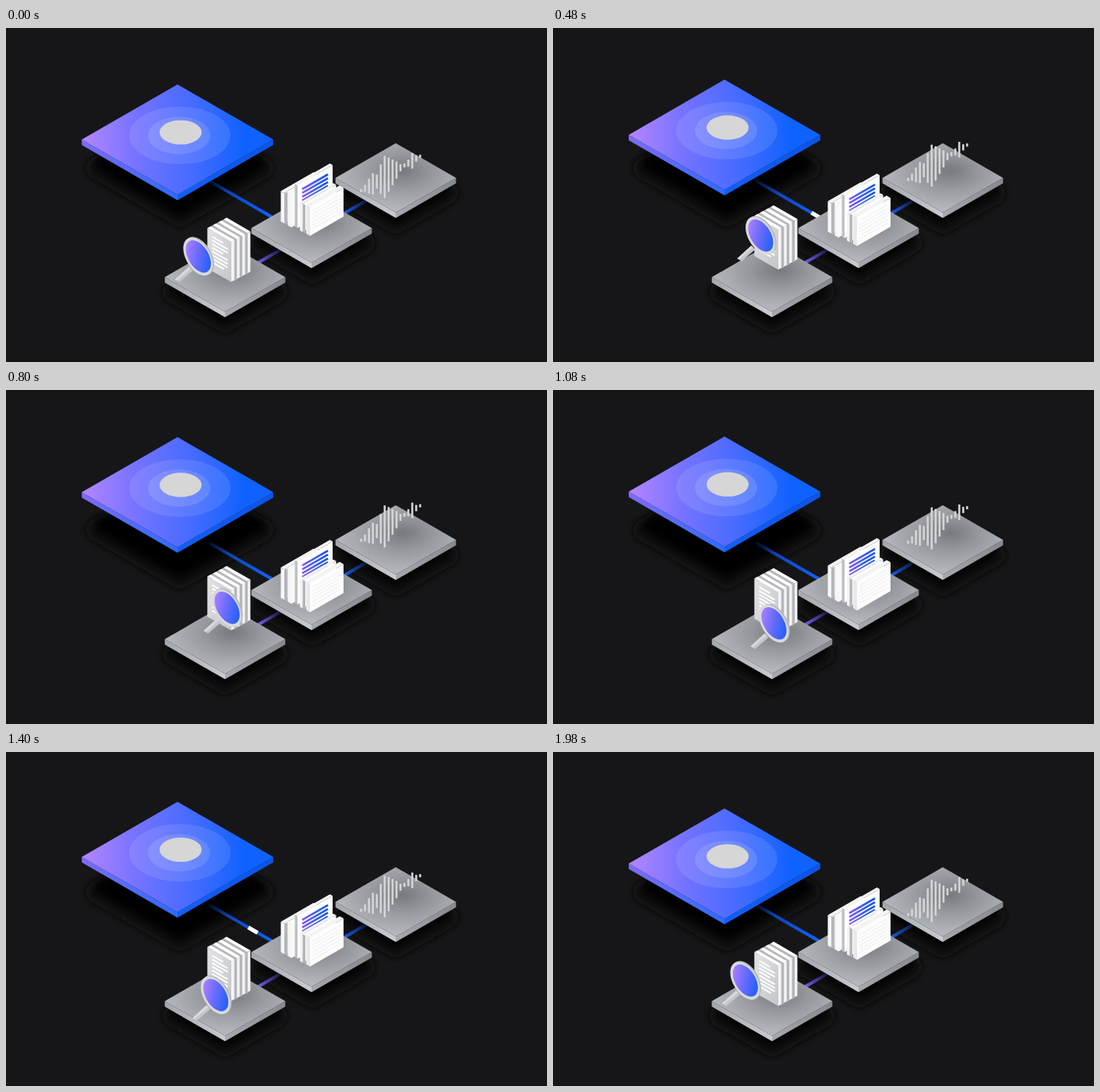
These frames come from a looping animation (694x429 px, 2.02 s). An HTML page:

```html
<!DOCTYPE html>
<html lang="en">
<head>
<meta charset="utf-8">
<title>Isometric platforms</title>
<style>
  html, body { margin: 0; width: 100%; height: 100%; overflow: hidden; background: #161618; }
  svg { display: block; width: 100%; height: 100%; }
</style>
</head>
<body>
<svg id="stage" viewBox="0 0 694 429">
  <defs>
    <linearGradient id="bigTop">
      <stop offset="0" stop-color="#b486ff"/><stop offset=".28" stop-color="#7673ff"/>
      <stop offset=".6" stop-color="#416aff"/><stop offset=".85" stop-color="#0f62fe"/>
    </linearGradient>
    <linearGradient id="bigLeft">
      <stop offset="0" stop-color="#7d6cf8"/><stop offset="1" stop-color="#2b6cff"/>
    </linearGradient>
    <linearGradient id="bigRight">
      <stop offset="0" stop-color="#1060f8"/><stop offset="1" stop-color="#0b54e4"/>
    </linearGradient>
    <radialGradient id="top" cx=".56" cy=".4" r=".55">
      <stop offset="0" stop-color="#77797d"/><stop offset=".45" stop-color="#95989c"/>
      <stop offset="1" stop-color="#b3b6bb"/>
    </radialGradient>
    <linearGradient id="left">
      <stop offset="0" stop-color="#a4a7ab"/><stop offset="1" stop-color="#c8cbcf"/>
    </linearGradient>
    <linearGradient id="right">
      <stop offset="0" stop-color="#a6a9ad"/><stop offset="1" stop-color="#85888c"/>
    </linearGradient>
    <linearGradient id="lens" x1="0" y1=".4" x2="1" y2=".6">
      <stop offset="0" stop-color="#a97fff"/><stop offset=".5" stop-color="#646afb"/>
      <stop offset="1" stop-color="#1f60fa"/>
    </linearGradient>
    <linearGradient id="text" gradientUnits="userSpaceOnUse" x1="380" y1="0" x2="413" y2="0">
      <stop offset="0" stop-color="#8a5cf0"/><stop offset=".5" stop-color="#3f5ff0"/>
      <stop offset="1" stop-color="#0f56e8"/>
    </linearGradient>
    <linearGradient id="page" x1="0" y1="0" x2="1" y2="1">
      <stop offset="0" stop-color="#e2e3e5"/><stop offset="1" stop-color="#c4c6c9"/>
    </linearGradient>
    <linearGradient id="mainBeam" gradientUnits="userSpaceOnUse" x1="260" y1="196" x2="340" y2="242">
      <stop offset="0" stop-color="#0f3fb0" stop-opacity=".15"/>
      <stop offset=".35" stop-color="#1044bc"/><stop offset="1" stop-color="#0f62fe"/>
    </linearGradient>
    <linearGradient id="rightBeam" gradientUnits="userSpaceOnUse" x1="434" y1="238" x2="462" y2="222">
      <stop offset="0" stop-color="#1a5cf0"/><stop offset="1" stop-color="#0c1634"/>
    </linearGradient>
    <linearGradient id="leftBeam" gradientUnits="userSpaceOnUse" x1="324" y1="301" x2="352" y2="285">
      <stop offset="0" stop-color="#6f5fe8"/><stop offset="1" stop-color="#14153a"/>
    </linearGradient>
    <filter id="soft" x="-20%" y="-30%" width="140%" height="160%"><feGaussianBlur stdDeviation="5"/></filter>
  </defs>
</svg>
<script>
const NS = 'http://www.w3.org/2000/svg';
const SLOPE = 0.577;
const LOOP = 2020, ACTIVE = 1980;
const stage = document.getElementById('stage');

function add(parent, tag, attrs) {
  const node = document.createElementNS(NS, tag);
  for (const key in attrs) node.setAttribute(key, attrs[key]);
  parent.appendChild(node);
  return node;
}
const group = (parent = stage) => add(parent, 'g', {});
const poly = (parent, points, fill, extra) =>
  add(parent, 'polygon', { points: points.join(' '), fill, ...extra });
const line = (parent, x1, y1, x2, y2, stroke, width) =>
  add(parent, 'line', { x1, y1, x2, y2, stroke, 'stroke-width': width });
const ellipse = (parent, cx, cy, rx, ry, fill, extra) =>
  add(parent, 'ellipse', { cx, cy, rx, ry, fill, ...extra });

const diamond = (cx, cy, hw) => {
  const hh = hw * SLOPE;
  return [[cx, cy - hh], [cx + hw, cy], [cx, cy + hh], [cx - hw, cy]];
};

// A faint wide layer with a darker core.
function shadow(cx, cy, hw) {
  const layer = (y, size, color, width) => poly(stage, diamond(cx, y, size), color, {
    stroke: color, 'stroke-width': width, 'stroke-linejoin': 'round', filter: 'url(#soft)'
  });
  layer(cy, hw, '#0e0e10', 28);
  layer(cy - 6, hw - 7, '#040405', 18);
}

function platform(parent, cx, cy, hw, fills) {
  const low = cy + hw * SLOPE, depth = 7;
  poly(parent, [[cx - hw, cy], [cx, low], [cx, low + depth], [cx - hw, cy + depth]], fills[1]);
  poly(parent, [[cx + hw, cy], [cx, low], [cx, low + depth], [cx + hw, cy + depth]], fills[2]);
  poly(parent, diamond(cx, cy, hw), fills[0]);
}

const tile = (cx, cy) =>
  platform(stage, cx, cy, 77.3, ['url(#top)', 'url(#left)', 'url(#right)']);

// Upright sheet whose face runs up to the right; (x, y) is the lower left corner of the face.
function sheetUp(parent, x, y, w, h, depth, side) {
  const rise = w * SLOPE, dy = depth * SLOPE;
  poly(parent, [[x, y], [x - depth, y - dy], [x - depth, y - h - dy], [x, y - h]], side);
  poly(parent, [[x, y - h], [x - depth, y - h - dy], [x + w - depth, y - h - rise - dy],
    [x + w, y - h - rise]], '#f4f4f4');
  poly(parent, [[x, y], [x + w, y - rise], [x + w, y - h - rise], [x, y - h]], '#fdfdfd');
}

// Upright sheet whose face runs down to the right; (x, y) is the upper left corner of the face.
function sheetDown(parent, x, y, w, h, depth) {
  const drop = w * SLOPE, dy = depth * SLOPE;
  poly(parent, [[x, y], [x + depth, y - dy], [x + w + depth, y + drop - dy], [x + w, y + drop]], '#ffffff');
  poly(parent, [[x + w, y + drop], [x + w + depth, y + drop - dy],
    [x + w + depth, y + drop + h - dy], [x + w, y + drop + h]], '#f4f4f5');
  poly(parent, [[x, y], [x + w, y + drop], [x + w, y + drop + h], [x, y + h]], 'url(#page)');
}

shadow(223, 180, 106);
shadow(500, 212, 66);
shadow(393, 276, 66);
shadow(281, 339, 66);

line(stage, 260, 196, 352, 249, 'url(#mainBeam)', 4.2);
line(stage, 420, 246, 472, 216, 'url(#rightBeam)', 4.2);
line(stage, 312, 308, 364, 278, 'url(#leftBeam)', 4.2);
const pulse = line(stage, -6, -3.5, 6, 3.5, '#ffffff', 5.2);

const hub = group();
platform(hub, 220, 143.3, 122.8, ['url(#bigTop)', 'url(#bigLeft)', 'url(#bigRight)']);
ellipse(hub, 223, 138, 65, 37, '#ffffff', { opacity: .1 });
ellipse(hub, 222, 138, 40, 24, '#ffffff', { opacity: .12 });
ellipse(hub, 224, 134, 27, 15.6, '#d6d6d6');

tile(500, 192.5);
const wave = group();
[4, 9, 19, 27, 18, 38, 54, 44, 33, 22, 9, 5, 9, 20, 8, 4].forEach((h, i) => {
  const x = 455.5 + i * 5.05, y = 209 - i * 2.95;
  line(wave, x, y - h / 2, x, y + h / 2, '#d4d5d7', 2.6);
});

tile(392, 257);
const files = group();
sheetUp(files, 357, 251, 42, 39, 4.5, '#f6f6f7');
poly(files, [[357, 251], [361.5, 253], [361.5, 211], [357, 212]], '#b4b6ba');
sheetUp(files, 366, 256, 42, 41, 4.5, '#f6f6f7');
poly(files, [[366, 256], [371, 253], [371, 206], [366, 211]], '#f9f9f9');
sheetUp(files, 374, 257, 45, 55, 3.5, '#bfc1c5');
for (let i = 0; i < 5; i++) {
  const y = 207 + i * 4.9;
  line(files, 380, y, 413, y - 19, 'url(#text)', 2.6);
}
sheetUp(files, 380.5, 262, 43, 36, 3.5, '#f4f4f5');
poly(files, [[380.5, 262], [384, 263.5], [384, 227], [380.5, 226]], '#b4b6ba');
sheetUp(files, 390, 267, 43, 37, 5, '#e9e9eb');
for (let i = 0; i < 6; i++) {
  const y = 235 + i * 4.6;
  line(files, 393, y, 429, y - 20.8, '#f1f1f4', 1.2);
}

tile(281, 320);
const papers = group();
for (let i = 3; i >= 0; i--) {
  const x = 258.3 + i * 6.9, y = 257 - i * 3.7;
  if (i < 3) {
    // gap between neighbouring sheets
    poly(papers, [[x + 4, y - 2], [x + 6.9, y - 3.7], [x + 38, y + 14.5], [x + 38, y + 66], [x + 34, y + 68]], '#b4b6b9');
  }
  sheetDown(papers, x, y, 30.5, 51.7, 4);
}
for (let i = 0; i < 8; i++) {
  const y = 268 + i * 4.7, end = [14, 20, 20, 14, 20, 20, 20, 15][i];
  line(papers, 264.5, y, 264.5 + end, y + end * SLOPE, '#ffffff', 2);
}

// Magnifier, drawn around the lens centre.
const glass = group();
poly(glass, [[-12, 13], [-7, 18], [-24.5, 33], [-30, 29.5]], '#c4c5c8');
poly(glass, [[-12, 13], [-9.5, 15.5], [-27.5, 31], [-30, 29.5]], '#d8d9dc');
const disc = (r, fill, dx = 0, dy = 0) =>
  add(glass, 'circle', { r, fill, transform: `matrix(.866 .5 0 1 ${dx} ${dy})` });
disc(21.8, '#b9babd', 1.4, -.7);
disc(21.8, '#d9dadd', -.5, .3);
disc(18.6, 'url(#lens)');

const clamp = v => Math.max(0, Math.min(1, v));
const ease = (p, k) => p < .5 ? .5 * (2 * p) ** k : 1 - .5 * (2 - 2 * p) ** k;

// Rises from 0 to 1 at the peak time and falls back by the end of the cycle.
const swing = (t, peak, k) =>
  ease(clamp(t < peak ? t / peak : (ACTIVE - t) / (ACTIVE - peak)), k);
const move = (node, x, y) => node.setAttribute('transform', `translate(${x} ${y})`);

function draw(time) {
  const t = Math.min(time % LOOP, ACTIVE);

  move(hub, 0, -13 * swing(t, 990, 2));
  move(files, 0, 18.5 * swing(t, 780, 2));
  const lift = swing(t, 660, 2.5);
  move(papers, 0, -17.8 * lift);
  move(wave, 0, -16.2 * lift);

  const p = t / ACTIVE;
  const angle = (-10 + 360 * p + 20 * Math.sin(Math.PI * p)) * Math.PI / 180;
  move(glass, 266 - 19.5 * Math.cos(angle), 289.5 - 23 * Math.sin(angle));

  const x = 316.5 + ((t % 1000) - 400) * .26;
  move(pulse, x, 228.5 + (x - 316.5) * SLOPE);
  pulse.setAttribute('visibility', x > 258 && x < 350 ? 'visible' : 'hidden');
}

const start = performance.now();
function tick() {
  draw(performance.now() - start);
  requestAnimationFrame(tick);
}
draw(0);
tick();
</script>
</body>
</html>
```
